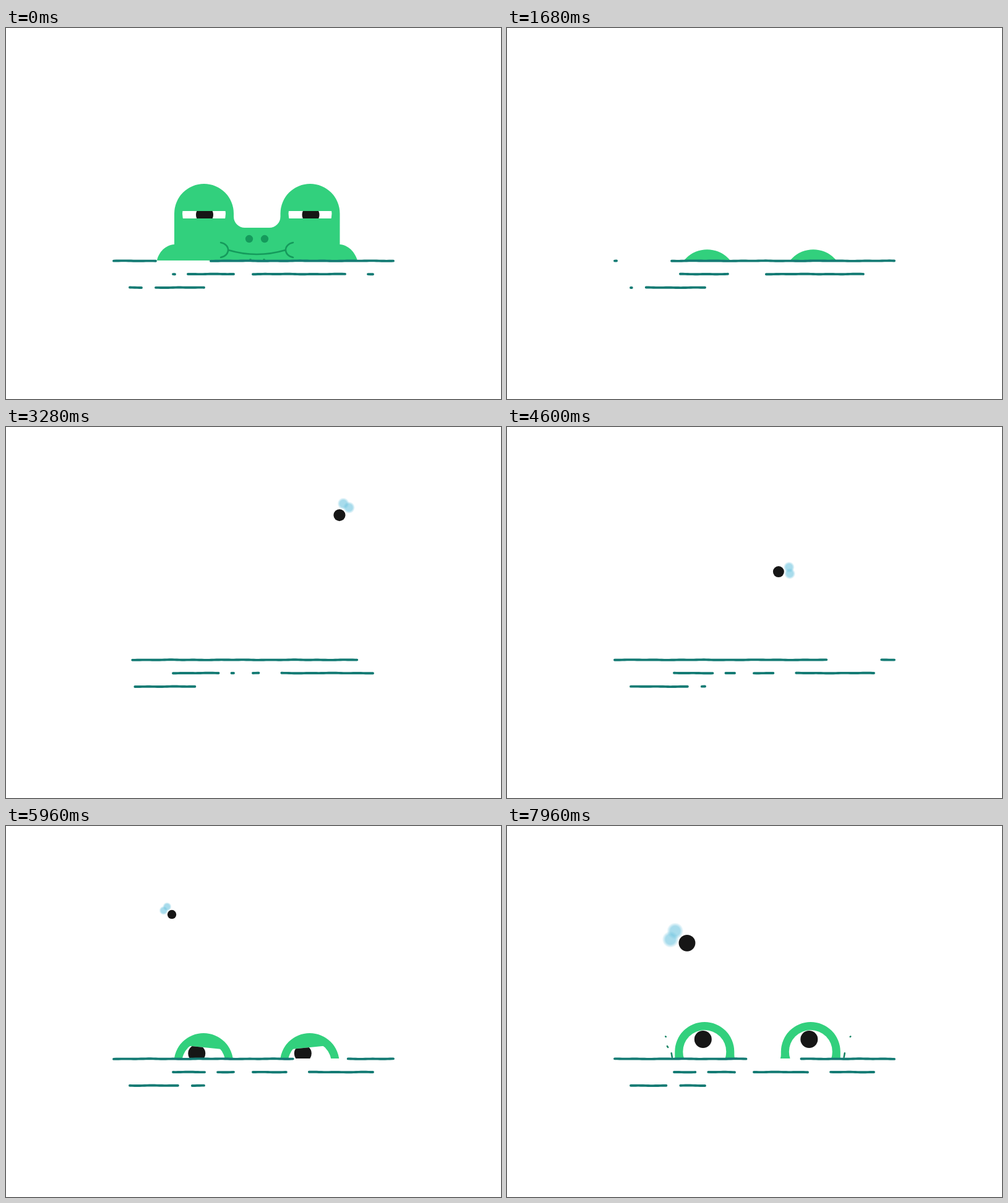
Recreate the animation shown at these times as an HTML page with a canvas. Size 800 by 600 pixels, loop 8 s.

```html
<!DOCTYPE html>
<html lang="en">
<head>
<meta charset="utf-8">
<title>Frog and fly</title>
<style>
  html, body { margin: 0; width: 100%; height: 100%; overflow: hidden; background: #fff; }
  canvas { display: block; }
</style>
</head>
<body>
<canvas id="stage" width="800" height="600"></canvas>
<script>
const ctx = document.getElementById('stage').getContext('2d');
const LOOP = 8000, WATER_CYCLE = 11700, SURFACE = 376, EYE_LEVEL = 300;
const GREEN = '#32d07d', DARK_GREEN = '#159a5c', TEAL = '#147b74', BLACK = '#161616';
const EYE_X = { left: 320, right: 491.5 };

const radians = degrees => degrees * Math.PI / 180;
const mix = (a, b, u) => a + (b - a) * u;

// Smooth 0..1 progress between two times.
function ease(t, from, to) {
  const u = Math.min(1, Math.max(0, (t - from) / (to - from)));
  return u * u * (3 - 2 * u);
}

function disc(x, y, r, fill) {
  ctx.fillStyle = fill;
  ctx.beginPath();
  ctx.arc(x, y, r, 0, 2 * Math.PI);
  ctx.fill();
}

function setPen(color, width) {
  ctx.strokeStyle = color;
  ctx.lineWidth = width;
  ctx.lineCap = 'round';
}

// Water: a gap drifts along each line and wraps around once per cycle.
const waterLines = [
  { y: 376.6, from: 174, to: 626, gap: 242, width: 89, dir: -1 },
  { y: 398, from: 270, to: 368, gap: 273, width: 21, dir: -1 },
  { y: 398, from: 399, to: 593, gap: 548, width: 37, dir: 1 },
  { y: 419.8, from: 200, to: 320, gap: 219, width: 23, dir: -1 }
];

function roughLine(x0, x1, y, tick) {
  const wobble = x => 0.3 * Math.sin(x * 0.11 + tick * 2.4 + y) * Math.cos(x * 0.047 + tick);
  ctx.beginPath();
  for (let x = x0; x < x1; x += 4) ctx.lineTo(x, y + wobble(x));
  ctx.lineTo(x1, y + wobble(x1));
  ctx.stroke();
}

function drawWater(t) {
  const tick = Math.floor(t / 80);
  setPen(TEAL, 3.9);
  for (const { y, from, to, gap, width, dir } of waterLines) {
    const length = to - from;
    const shift = gap - from + dir * length * t / WATER_CYCLE;
    const start = from + (shift + length) % length;
    const end = start + width;
    const wrapped = Math.max(0, end - to);
    if (start > from + wrapped) roughLine(from + wrapped, start, y, tick);
    if (end < to) roughLine(end, to, y, tick);
  }
}

const body = new Path2D(`M244 376 C247 362 258 351 272 350 V300 A48 48 0 0 1 368 300 V305
  A18 18 0 0 0 386 323 H425.5 A18 18 0 0 0 443.5 305 V300 A48 48 0 0 1 539.5 300 V350
  C553 351 564 362 568 376 V440 H244 Z`);
const mouth = new Path2D(`M347 347 C363 350 363 368 347 371 M464 347 C448 350 448 368 464 371
  M359 359 Q405 373 452 359`);

// Lids and pupil are relative to the eye centre.
const sleepy = { upper: -4, lower: 8, slant: 0, pupilX: 1, pupilY: 2 };
const wary = { upper: -25, lower: 40, slant: 0.1, pupilX: -11, pupilY: -15 };
const alert = { upper: -40, lower: 40, slant: 0, pupilX: -2.5, pupilY: -20 };

function eyePose(t) {
  if (t < 3000) return sleepy;
  const surprise = ease(t, 7500, 7750);
  return Object.fromEntries(Object.keys(wary).map(k => [k, mix(wary[k], alert[k], surprise)]));
}

function eyeHeight(t) {
  const s = t / 1000;
  if (s < 3) return EYE_LEVEL + 58.3 * s + 2.9 * s * s;
  return 434 - 51 * ease(t, 5400, 5900) - 18 * ease(t, 7500, 7800);
}

function drawEye(x, side, { upper, lower, slant, pupilX, pupilY }) {
  ctx.save();
  ctx.translate(x, EYE_LEVEL);
  ctx.beginPath();
  ctx.arc(0, 0, 35, 0, 2 * Math.PI);
  ctx.clip();
  ctx.beginPath();
  ctx.moveTo(-40, upper - 40 * slant * side);
  ctx.lineTo(40, upper + 40 * slant * side);
  ctx.lineTo(40, lower);
  ctx.lineTo(-40, lower);
  ctx.clip();
  ctx.fillStyle = '#fff';
  ctx.fillRect(-40, -40, 80, 80);
  disc(pupilX, pupilY, 14, BLACK);
  ctx.restore();
}

function drawFrog(t) {
  const sway = t < 2000 ? 7.2 * Math.sin(Math.PI * t / 2000) : -0.7;
  const pose = eyePose(t);
  ctx.save();
  ctx.beginPath();
  ctx.rect(0, 0, 800, SURFACE);
  ctx.clip();
  ctx.translate(sway, eyeHeight(t) - EYE_LEVEL);
  ctx.fillStyle = GREEN;
  ctx.fill(body);
  drawEye(EYE_X.left, 1, pose);
  drawEye(EYE_X.right, -1, pose);
  for (const side of [-1, 1]) {
    disc(405.5 + 12.5 * side, 341, 6.2, DARK_GREEN);
    disc(406 + 11 * side, 375, 2, DARK_GREEN);
  }
  setPen(DARK_GREEN, 2.5);
  ctx.stroke(mouth);
  ctx.restore();
}

// The fly passes each point in the given heading; its wings trail behind.
const flyStops = [
  { time: 2600, x: 830, y: 94, r: 9.6, heading: 165 },
  { time: 3280, x: 539, y: 142.5, r: 9.6, heading: 125 },
  { time: 4600, x: 439, y: 234, r: 9, heading: 173 },
  { time: 5960, x: 268, y: 143, r: 7.2, heading: 42 },
  { time: 7000, x: 300, y: 215, r: 10, heading: 180 },
  { time: 7960, x: 291, y: 189.3, r: 13.4, heading: 29 }
];

// Cubic curve between two stops, leaving and arriving along their headings.
function flyPose(t) {
  const next = Math.max(1, flyStops.findIndex(stop => stop.time > t));
  const a = flyStops.at(t < LOOP - 40 ? next - 1 : -2);
  const b = flyStops.at(t < LOOP - 40 ? next : -1);
  const u = Math.min(1, (t - a.time) / (b.time - a.time)), v = 1 - u;
  const reach = Math.hypot(b.x - a.x, b.y - a.y) / 3;
  const along = (axis, turn) => {
    const p = a[axis], s = b[axis];
    const q = p + reach * turn(radians(a.heading)), r = s - reach * turn(radians(b.heading));
    return {
      at: v * v * v * p + 3 * v * v * u * q + 3 * v * u * u * r + u * u * u * s,
      speed: v * v * (q - p) + 2 * v * u * (r - q) + u * u * (s - r)
    };
  };
  const x = along('x', Math.cos), y = along('y', Math.sin);
  return { x: x.at, y: y.at, r: mix(a.r, b.r, u), tail: Math.atan2(-y.speed, -x.speed) };
}

function drawWing(x, y, r) {
  const soft = ctx.createRadialGradient(x, y, r * 0.65, x, y, r * 1.12);
  soft.addColorStop(0, 'rgba(110,196,223,.6)');
  soft.addColorStop(1, 'rgba(110,196,223,0)');
  disc(x, y, r * 1.12, soft);
}

function drawFly(t) {
  if (t < flyStops[0].time) return;
  const { x, y, r, tail } = flyPose(t);
  for (const side of [-1, 1]) {
    const angle = tail + side * radians(16.5);
    drawWing(x + 2.05 * r * Math.cos(angle), y + 2.05 * r * Math.sin(angle), r * 0.9);
  }
  disc(x, y, r, BLACK);
}

// Droplets fan out from the outer side of an eye, the higher ones shorter.
function drawDroplets(x, side, count, spread) {
  for (let i = 0; i < count; i++) {
    const lift = i / (count - 1);
    const angle = radians(mix(6, -21, lift)), tilt = radians(mix(80, 35, lift));
    const radius = mix(48, mix(54, 68, lift), spread);
    const length = 0.3 + 3 * (1 - lift) ** 2;
    ctx.save();
    ctx.translate(x, 365);
    ctx.scale(side, 1);
    ctx.translate(radius * Math.cos(angle), radius * Math.sin(angle));
    ctx.beginPath();
    ctx.moveTo(length * Math.cos(tilt), -length * Math.sin(tilt));
    ctx.lineTo(-length * Math.cos(tilt), length * Math.sin(tilt));
    ctx.stroke();
    ctx.restore();
  }
}

function drawSplash(t) {
  if (t < 7680) return;
  const spread = ease(t, 7600, 7960);
  setPen('#158464', 2.6);
  drawDroplets(EYE_X.left, -1, 3, spread);
  drawDroplets(EYE_X.right, 1, 2, spread);
}

const startTime = performance.now();

function render() {
  const t = (performance.now() - startTime) % LOOP;
  ctx.clearRect(0, 0, 800, 600);
  drawFrog(t);
  drawSplash(t);
  drawWater(t);
  drawFly(t);
  requestAnimationFrame(render);
}
render();
</script>
</body>
</html>
```
